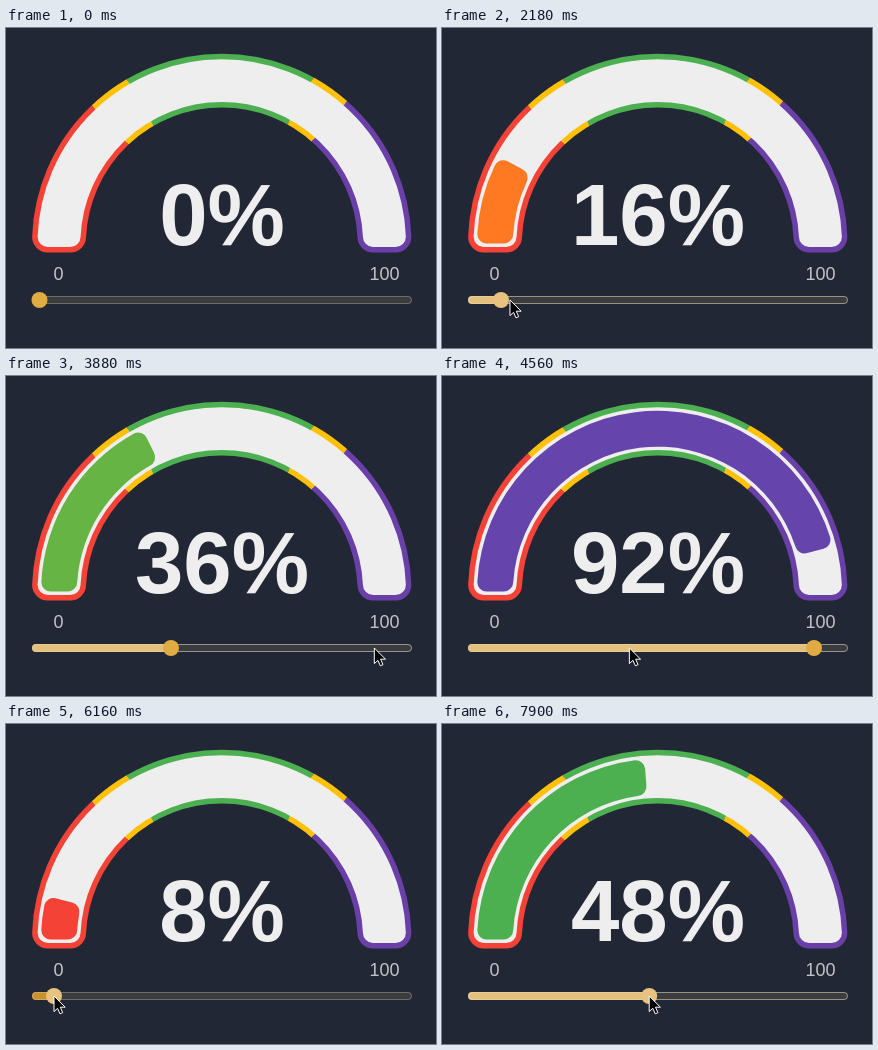
An HTML page for the animation above (8000 ms loop, 430 by 320 pixels).

```html
<!DOCTYPE html>
<html lang="en">
<head>
<meta charset="utf-8">
<title>Gauge with slider</title>
<style>
  html, body { margin: 0; height: 100%; overflow: hidden; background: #222736; }
  svg { display: block; }
  text { font-family: "Liberation Sans", Arial, sans-serif; text-anchor: middle; }
  #label { font-size: 87px; font-weight: bold; fill: #eee; }
  .limit { font-size: 18px; fill: #c2c3c5; }
</style>
</head>
<body>
<svg width="430" height="320" viewBox="0 0 430 320">
  <mask id="rim" maskUnits="userSpaceOnUse" x="0" y="0" width="430" height="320">
    <path id="edge" fill="none" stroke="#fff" stroke-width="5.5"/>
  </mask>
  <path id="track" fill="#eee"/>
  <g id="zones" mask="url(#rim)" fill="none" stroke-width="70"></g>
  <path id="fill"/>
  <text id="label" x="216" y="217"></text>
  <text class="limit" x="52.5" y="252">0</text>
  <text class="limit" x="378.5" y="252">100</text>
  <rect x="26" y="268" width="380" height="8" rx="4" fill="#3a3c3f"/>
  <rect id="bar" x="26" y="268" height="8" rx="4"/>
  <rect id="border" x="26.5" y="268.5" width="379" height="7" rx="3.5" fill="none" stroke="#e4dcb8"/>
  <circle id="thumb" cy="272" r="8"/>
  <path id="cursor" d="M0 0V15.6L3.6 12.3 6 17.8 8.7 16.7 6.3 11.2H11.2Z"
        fill="#000" stroke="#fff"/>
</svg>
<script>
const LOOP = 8000, TWEEN = 800, REST = 160, EARLY = 60, PRESS = 130;
const CX = 215.75, CY = 215.5, DEG = Math.PI / 180, SLIDER_Y = 272;
const RED = '#f44336', YELLOW = '#ffc107', GREEN = '#4caf50', PURPLE = '#6a40a8';

// colour and upper angle of each zone, measured from the left end
const ZONES = [[RED, 46.8], [YELLOW, 60], [GREEN, 119], [YELLOW, 131.4], [PURPLE, 190]];

// where the pointer stops along the slider; it clicks unless it only passes by
const STOPS = [
  { t: 20, x: 445, pass: true }, { t: 400, x: 325 }, { t: 1390, x: 134 },
  { t: 1978, x: 59 }, { t: 2560, x: 289 }, { t: 3050, x: 140 }, { t: 3500, x: 165 },
  { t: 3960, x: 372 }, { t: 4950, x: 68.5 }, { t: 5340, x: 87, pass: true },
  { t: 6060, x: 48 }, { t: 6904, x: 207.2 }
];
const CLICKS = STOPS.filter(s => !s.pass);

const $ = id => document.getElementById(id);
const set = (id, attrs) => {
  for (const k in attrs) $(id).setAttribute(k, attrs[k]);
};
const clamp = p => Math.max(0, Math.min(1, p));
const lerp = (a, b, p) => a + (b - a) * p;
const easeOut = p => 1 - (1 - p) ** 3;
const smooth = p => p * p * (3 - 2 * p);
const point = (r, a) =>
  `${(CX - r * Math.cos(a)).toFixed(2)} ${(CY - r * Math.sin(a)).toFixed(2)}`;

// Rounded ring piece from angle a to b, both ends lengthened by ext pixels
function band(ro, ri, a, b, ext, r) {
  const arc = (rad, sweep, p) => `A${rad} ${rad} 0 0 ${sweep} ${p}`;
  const start = (rad, d) => point(rad, a - d / rad);
  const end = (rad, d) => point(rad, b + d / rad);
  return 'M' + start(ro, ext - r) + arc(ro, 1, end(ro, ext - r))
    + arc(r, 1, end(ro - r, ext)) + 'L' + end(ri + r, ext)
    + arc(r, 1, end(ri, ext - r)) + arc(ri, 0, start(ri, ext - r))
    + arc(r, 1, start(ri + r, ext)) + 'L' + start(ro - r, ext)
    + arc(r, 1, start(ro, ext - r)) + 'Z';
}

// Each click starts a tween from whatever the gauge shows at that moment
function gaugeAt(t) {
  const state = { value: 0, color: RED, x: 33.5, pressed: false };
  CLICKS.filter(c => c.t <= t).forEach((click, i) => {
    const until = Math.min(t, CLICKS[i + 1]?.t ?? LOOP);
    const p = easeOut(clamp((until - click.t) / TWEEN));
    const target = (click.x - 33.5) / 3.645;
    const zone = ZONES.find(z => target * 1.8 <= z[1])[0];
    state.value = lerp(state.value, target, p);
    state.color = `color-mix(in lch, ${state.color}, ${zone} ${(p * 100).toFixed(2)}%)`;
    state.x = click.x;
    state.pressed = t - click.t < PRESS;
  });
  return state;
}

// Rest at a stop, then glide to the next one and arrive a little early
function pointerAt(t) {
  const i = Math.max(0, STOPS.findLastIndex(s => s.t <= t));
  const a = STOPS[i], b = STOPS[i + 1] ?? a;
  const leave = a.t + REST, arrive = b.t - EARLY;
  return lerp(a.x, b.x, smooth(clamp((t - leave) / (arrive - leave))));
}

function draw(t) {
  const { value, color, x, pressed } = gaugeAt(t);
  const px = pointerAt(t);
  const hover = px < 406;
  const onThumb = Math.abs(px - x) < 9;
  const angle = value * 1.8 * DEG;

  const corner = Math.min(9.5, angle * 144.8 / 2);
  set('fill', { d: value > 0.3 ? band(180.7, 144.8, 0, angle, 0, corner) : '' });
  $('fill').style.fill = color;
  $('label').textContent = Math.ceil(value) + '%';

  set('border', { 'stroke-opacity': hover && !pressed ? 0.55 : 0.3 });
  set('bar', { width: x - 26, fill: pressed ? '#c8912f' : '#e5c07b' });
  set('thumb', { cx: x, fill: onThumb ? '#e8c27e' : '#dfab42' });
  set('cursor', { transform: `translate(${px} ${SLIDER_Y})` });
}

const outline = band(187, 138.6, 0, Math.PI, 6.3, 13);
set('edge', { d: outline });
set('track', { d: outline });
let from = -10;
$('zones').innerHTML = ZONES.map(([color, to]) => {
  const d = `M${point(163, from * DEG)}A163 163 0 0 1 ${point(163, to * DEG)}`;
  from = to;
  return `<path d="${d}" stroke="${color}"/>`;
}).join('');

const began = performance.now();
function tick() {
  draw((performance.now() - began) % LOOP);
  requestAnimationFrame(tick);
}
tick();
</script>
</body>
</html>
```
